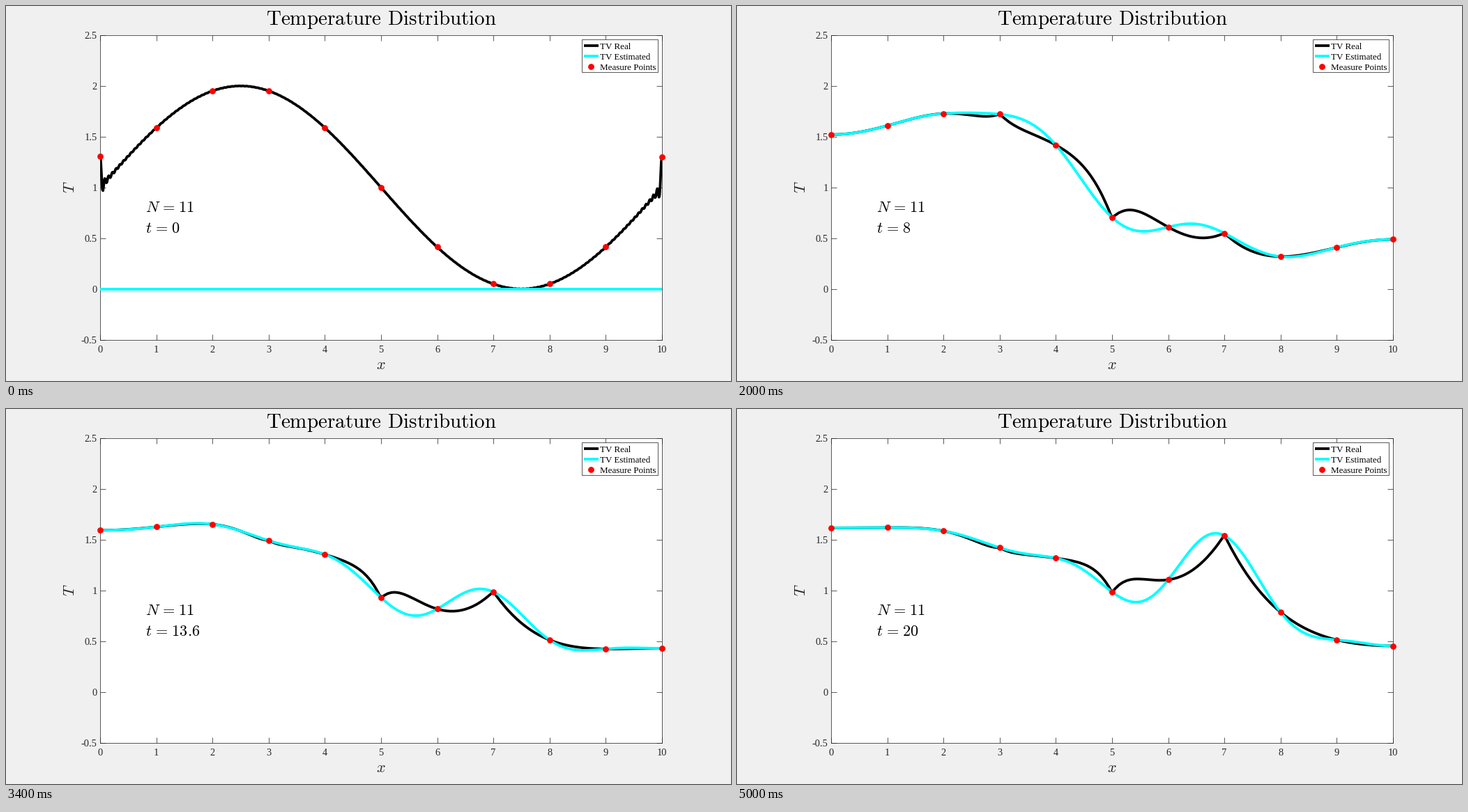
Animation, 1040 px wide and 539 px high, one loop 5100 ms. Source, as a matplotlib script:

```python
import numpy as np
import matplotlib.pyplot as plt
from matplotlib.animation import FuncAnimation
from matplotlib.patches import Rectangle

W, H, DPI = 1040, 539, 64
PX = 72 / DPI                      # points per pixel
LEFT, RIGHT, TOP, BOTTOM = 135.1, 940.8, 42, 479.6
FRAMES, INTERVAL, DT = 51, 100, 0.4
INK = "#262626"

plt.rcParams["mathtext.fontset"] = "cm"

# Heat equation on [0, L] with insulated ends, solved with cosine modes.
L, K, MODES, DX = 10, 0.1, 300, 0.01
x = np.linspace(0, L, 1001)
points = np.arange(11)
n = np.arange(MODES + 1)
decay = K * (n * np.pi / L) ** 2
decay[0] = 1e-5                    # keeps the formulas finite for the mean
norm = np.where(n == 0, 1, 2) / L


def modes(at, count):
    return np.cos(np.outer(at, np.arange(count)) * np.pi / L)


basis = modes(x, MODES + 1)
start = norm * DX * (basis.T @ (1 + np.sin(np.pi * x / 5)))
sample_basis = modes(points, len(points))
estimate_basis = modes(x, len(points))


def sine_source(t, phase):
    """Mode response to a source sin(t - phase) switched on at t = 0."""
    s = t - phase
    fade = np.exp(-decay * t) * (np.cos(phase) + decay * np.sin(phase))
    return (decay * np.sin(s) - np.cos(s) + fade) / (decay ** 2 + 1)


def ramp_source(t):
    return t / decay + np.expm1(-decay * t) / decay ** 2


def temperature(t):
    at = lambda pos: np.cos(n * np.pi * pos / L)
    heat = (0.1 * at(3) * sine_source(t, np.pi / 4)
            - 0.2 * at(5) * sine_source(t, 0)
            + 0.01 * at(7) * ramp_source(t))
    return basis @ (start * np.exp(-decay * t) + norm * heat)


fig = plt.figure(figsize=(W / DPI, H / DPI), dpi=DPI, facecolor="#f0f0f0")
ax = fig.add_axes([LEFT / W, 1 - BOTTOM / H, (RIGHT - LEFT) / W, (BOTTOM - TOP) / H])
ax.set(xlim=(0, L), ylim=(-0.5, 2.5), xticks=range(11), yticks=np.arange(-0.5, 2.6, 0.5))
ax.set_axisbelow(True)
ax.tick_params(direction="in", length=8 * PX, width=0.75 * PX, color=INK, top=True,
               right=True, labelbottom=False, labelleft=False)
for spine in ax.spines.values():
    spine.set(linewidth=0.75 * PX, color=INK, zorder=1)

# Overlay measured in pixels for all text and the legend.
page = fig.add_axes([0, 0, 1, 1], xlim=(0, W), ylim=(H, 0))
page.axis("off")


def write(px, py, text, size, **kw):
    kw.setdefault("family", "Liberation Serif")
    return page.text(px, py, text, fontsize=size * PX, va="baseline", **kw)


for i in range(11):
    write(LEFT + i * (RIGHT - LEFT) / 10, 498, str(i), 14.4, ha="center", color=INK)
for i in range(7):
    y = BOTTOM - i * (BOTTOM - TOP) / 6
    write(130.6, y + 5, f"{-0.5 + i * 0.5:g}", 14.4, ha="right", color=INK)

EQ = r"\hspace{0.116}=\hspace{0.116}"
write(538.3, 27, r"$\mathrm{Temperature}\hspace{0.38}\mathrm{Distribution}$", 29.1, ha="center")
write(538.3, 521.5, "$x$", 22.2, ha="center", color=INK)
write(98.5, 260.3, "$T$", 22.2, ha="center", color=INK, rotation=90, rotation_mode="anchor")
write(200, 296.3, f"$N{EQ}11$", 22.3)
clock = write(200, 325.5, "", 22.3)

LINE = dict(lw=3.8 * PX, solid_capstyle="butt", solid_joinstyle="round")
DOT = dict(ls="", marker="o", ms=8.8 * PX, color="red", mew=0)

page.add_patch(Rectangle((826, 48), 109, 47, fc="white", ec=INK, lw=0.75 * PX))
page.plot([828.5, 850], [57, 57], color="black", **LINE)
page.plot([828.5, 850], [72, 72], color="cyan", **LINE)
page.plot([839], [87], **DOT)
for y, label in ((62, "TV Real"), (77, "TV Estimated"), (92, "Measure Points")):
    write(851.5, y, label, 13)

real, = ax.plot([], [], color="black", zorder=3, **LINE)
estimate, = ax.plot([], [], color="cyan", zorder=4, **LINE)
dots, = ax.plot([], [], zorder=5, clip_on=False, **DOT)


def draw(frame):
    t = frame * DT
    profile = temperature(t)
    samples = profile[::100]
    weights = np.linalg.solve(sample_basis, samples)
    real.set_data(x, profile)
    # The estimator has no readings yet at the very start.
    estimate.set_data(x, estimate_basis @ weights if frame else np.zeros_like(x))
    dots.set_data(points, samples)
    clock.set_text(f"$t{EQ}{round(t, 1):g}$")
    return real, estimate, dots, clock


anim = FuncAnimation(fig, draw, frames=FRAMES, interval=INTERVAL,
                     init_func=lambda: draw(0), repeat=True, repeat_delay=0, blit=False)
plt.show()
```
